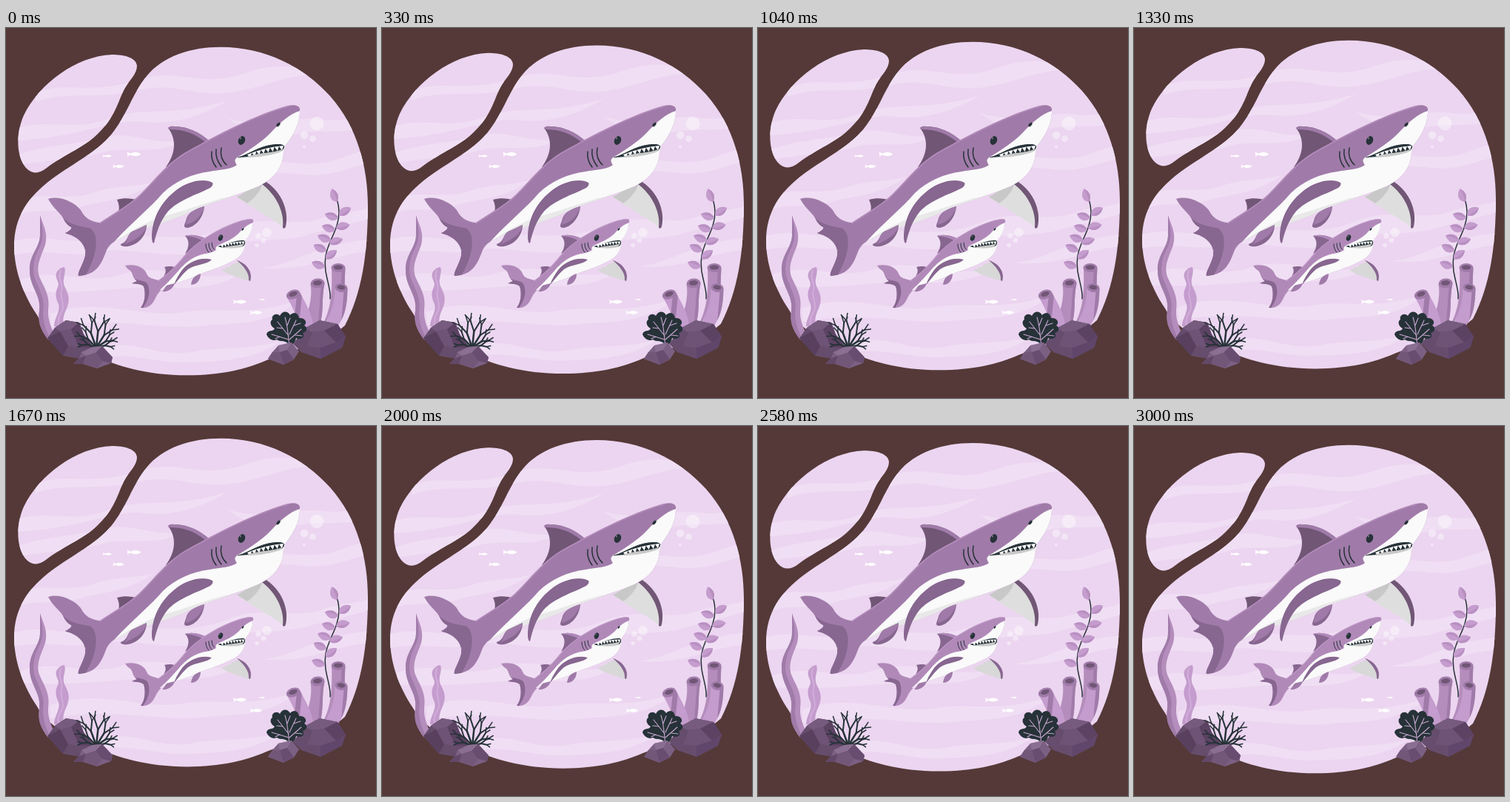
These frames come from a looping animation (500x500 px, 3040 ms). An HTML page with a canvas:

```html
<!DOCTYPE html>
<html lang="en">
<head>
<meta charset="utf-8">
<title>Two sharks</title>
<style>
html, body { margin: 0; width: 100%; height: 100%; overflow: hidden; background: #543938; }
canvas { display: block; width: 500px; height: 500px; }
</style>
</head>
<body>
<canvas id="stage"></canvas>
<script>
const LOOP = 3040, FPS = 24, RISE = 10;
const INK = '#263238', BODY = '#a07ba9', DEEP = '#715676', MID = '#876690', PALE = '#b48dbc', PINK = '#c49ccd';
const canvas = document.getElementById('stage');
const dpr = window.devicePixelRatio || 1;
canvas.width = canvas.height = 500 * dpr;
const ctx = canvas.getContext('2d');

let pen = ctx;
function fill(d, color) {
  pen.fillStyle = color;
  pen.fill(new Path2D(d));
}
function line(d, color, width) {
  pen.strokeStyle = color;
  pen.lineWidth = width;
  pen.lineCap = pen.lineJoin = 'round';
  pen.stroke(new Path2D(d));
}
function oval(x, y, rx, ry, color, turn = 0) {
  pen.fillStyle = color;
  pen.beginPath();
  pen.ellipse(x, y, rx, ry, turn, 0, Math.PI * 2);
  pen.fill();
}
function clipped(d, draw) {
  pen.save();
  pen.clip(new Path2D(d));
  draw();
  pen.restore();
}

// Water, the only part that moves
const POOL = 'M290 25.7C350 25.7 402 52 438 92C476 135 489 190 489 240C489 305 481 358 458 402C432 426 390 434 352 449C325 461 290 469.3 245 469.3C190 469.3 150 457 118 442C85 428 56 414 42 388C20 355 11 322 11 295C11 255 30 228 62 204C92 182 128 165 146 139C166 112 169 92 190 65C212 38 250 25.7 290 25.7Z';
const DROP = 'M177 51C176 40 160 36 143 36C95 38 45 75 24 118C12 145 15 175 27 189C35 198 45 197 55 189C80 170 108 160 125 142C150 118 152 95 162 79C168 69 177 62 177 51Z';
const WATER = new Path2D(POOL + DROP);
const BANDS = [
  'M40 88C80 70 110 92 180 70C230 52 260 82 320 62C360 48 390 48 420 64C380 62 350 80 310 86C260 96 230 72 180 84C120 98 80 84 40 100Z',
  'M10 137C60 120 90 142 140 122C190 105 220 122 300 98C260 122 220 132 180 126C140 124 100 148 10 152Z',
  'M15 172C60 156 85 160 130 148C170 138 200 160 240 152C200 174 165 158 130 168C90 180 60 176 15 186Z',
  'M300 122C350 138 390 118 430 124C460 128 480 118 495 112L495 130C460 146 430 136 400 142C360 148 330 146 300 122Z',
  'M310 184C370 174 400 190 440 180C460 174 480 164 495 166L495 182C460 188 440 202 400 198C370 194 340 198 310 184Z',
  'M10 236C50 218 80 236 120 222C150 212 170 216 200 208C160 236 130 232 100 242C60 254 40 240 10 256Z',
  'M5 290C50 274 80 296 130 284C180 272 240 296 300 270C350 250 390 272 430 256C460 246 480 250 495 240L495 256C460 268 430 272 400 282C350 290 310 284 280 300C220 316 170 294 130 302C90 312 50 296 5 308Z',
  'M20 340C70 322 110 350 160 332C210 316 260 348 320 330C280 358 230 350 190 350C140 352 100 360 20 356Z',
  'M345 324C390 322 410 294 490 286L490 302C440 306 410 330 345 324Z',
  'M60 386C130 362 180 394 240 384C290 376 330 392 400 366C350 404 310 398 270 402C210 410 150 388 60 404Z',
  'M120 434C170 416 200 446 250 438C290 430 320 436 370 424C330 452 280 450 240 452C200 452 170 438 120 446Z'
];
function water(dy) {
  ctx.save();
  ctx.translate(0, dy);
  ctx.clip(WATER);
  ctx.fillStyle = '#ecd5f0';
  ctx.fillRect(0, 0, 500, 500);
  BANDS.forEach(b => fill(b, '#f0dff4'));
  ctx.restore();
}

function teeth(x0, y0, x1, y1, bend, n, size) {
  pen.fillStyle = '#fff';
  pen.beginPath();
  const at = u => [x0 + (x1 - x0) * u, y0 + (y1 - y0) * u + bend * 4 * u * (1 - u)];
  for (let i = 0; i < n; i++) {
    const a = at(i / n), b = at((i + .5) / n), c = at((i + 1) / n);
    pen.moveTo(a[0], a[1]);
    pen.lineTo(b[0] + 1, b[1] + size);
    pen.lineTo(c[0], c[1]);
  }
  pen.fill();
}

function bigShark() {
  // far fins
  fill('M312 228C325 222 338 211 347 206C365 214 378 238 379 253C379 262 379 268 376 271C366 260 337 247 312 228Z', '#dedede');
  fill('M312 228C325 222 338 211 347 206C346 219 337 229 326 237Z', '#c8c8c8');
  fill('M340 207Q347 203 353 209C372 222 383 247 378 268Q377 272 374 270C377 247 363 221 340 207Z', DEEP);
  fill('M216 188C228 172 232 152 219 135Q222 132 227 133C247 133 262 142 274 152L264 168Z', DEEP);
  fill('M219 135Q222 132 227 133C247 133 262 142 274 152L269 154C254 142 240 137 222 137Z', BODY);
  fill('M148 258C154 248 154 240 150 232C160 229 170 230 179 233L166 250Z', DEEP);
  // body
  const body = 'M57 231C72 226 92 235 101 246C106 256 114 262 127 263C146 250 160 243 178 228C200 208 216 182 248 165C282 146 340 116 381 105C390 103 396 105 397 109C398 122 393 140 378 158L375 169C374 188 363 203 343 213C318 225 280 234 252 247C218 263 184 271 162 281C147 287 141 291 136 300C130 316 124 334 98 335C96 331 104 320 107 308C109 296 101 287 94 283C88 279 84 279 80 277C85 275 90 271 88 269C80 265 79 259 76 255C71 248 62 241 57 231Z';
  fill(body, BODY);
  clipped(body, () => {
    fill('M397 112C382 117 372 127 362 137C350 151 333 162 314 174Q306 178 312 185C305 191 290 191 275 194C250 197 228 208 212 223C196 242 170 263 147 288L190 300L330 240L390 190L405 112Z', '#fafafa');
    fill('M146 289C170 273 190 262 215 254C245 246 275 234 300 228L300 240L170 290Z', '#e9e9e9');
    fill('M76 255C84 265 98 268 112 270C126 275 126 305 105 338L96 335L108 300L75 275Z', MID);
    line('M127 263C146 250 160 243 178 228C200 208 216 182 248 165C282 146 340 116 381 105', PALE, 3);
  });
  // near fins
  fill('M279 209C270 203 250 206 236 215C211 231 197 256 197 283Q197 290 200 291C204 274 208 262 218 249C232 233 256 226 276 216Q281 212 279 209Z', MID);
  fill('M190 266C190 281 178 293 165 295C159 296 154 294 155 292C167 288 162 278 173 274Z', MID);
  fill('M190 266C188 279 176 286 159 293C167 287 162 278 173 274Z', BODY);
  fill('M268 241C267 256 256 269 245 270C239 270 241 266 243 261C245 250 252 246 268 241Z', MID);
  fill('M268 241C265 254 255 263 243 266C245 250 252 246 268 241Z', BODY);
  // face
  fill('M314 175C328 171 342 160 360 158Q374 156 376 160C376 165 372 167 366 168C350 172 334 174 314 175Z', INK);
  teeth(326, 171, 375, 159, -2, 8, 6);
  fill('M322 175C344 167 361 170 375 163L370 168C350 174 337 175 322 175Z', '#c9c9c9');
  line('M314 175C328 171 342 160 360 158Q374 156 376 160', INK, 1);
  oval(318.5, 152, 4.4, 6.2, INK, .45);
  oval(317, 149, 1, 1.3, '#6b7378', .4);
  oval(368, 130.5, 1.8, 3.4, INK, .7);
  line('M278 167C277 175 280 183 284 188M284 164C283 172 286 181 291 187M291 162C289 171 292 180 298 185', INK, 1.5);
}

function smallShark() {
  const skin = '#b189b9';
  fill('M291 327C300 324 307 318 316 315C325 320 331 331 331 340Q331 343 328 342C318 338 302 335 291 327Z', '#d8d8d8');
  fill('M312 314C326 318 334 331 330 342L328 341C329 331 322 323 312 314Z', MID);
  fill('M242 305C248 295 248 287 242 281C253 278 262 281 271 285L261 295Z', MID);
  fill('M242 281C253 278 262 281 271 285L266 288C259 283 250 282 242 281Z', skin);
  fill('M211 339C216 332 217 327 214 323Q222 321 228 323L222 333Z', MID);
  const body = 'M161 321C174 318 187 323 190 332C192 338 199 339 206 341C219 332 229 322 239 310C250 296 270 281 293 270C308 263 322 258 331 258Q335 258 334 263C333 273 329 281 323 288L323 295C320 308 311 313 300 318C286 325 269 329 257 335C242 342 225 345 214 351C207 355 204 361 201 367C197 375 191 379 182 378C188 371 189 358 186 349C181 345 174 346 170 345L177 342C170 337 172 332 168 328Q163 325 161 321Z';
  fill(body, skin);
  clipped(body, () => {
    fill('M334 263C327 265 320 271 314 278C305 286 297 289 286 294Q282 297 284 300C278 305 268 304 259 308C248 312 240 320 234 327C226 336 220 343 208 354L232 355L300 325L330 305L340 264Z', '#fafafa');
    fill('M170 338C180 342 191 341 192 348C196 360 191 370 184 380L180 378L186 352L168 346Z', MID);
    line('M206 341C219 332 229 322 239 310C250 296 270 281 293 270C308 263 322 258 331 258', '#c19bc9', 2);
  });
  fill('M278 313C263 309 247 316 238 327Q230 338 227 347C233 341 237 334 246 326C256 319 272 320 278 313Z', MID);
  fill('M228 345C226 352 219 357 211 356C216 352 214 348 220 347Z', BODY);
  fill('M263 332C263 341 257 347 250 347C251 340 253 335 263 332Z', BODY);
  fill('M286 295C297 293 304 288 318 287Q323 286 323 290C323 295 319 296 314 296C303 297 294 298 286 295Z', INK);
  teeth(290, 293.5, 322, 288.5, -1.3, 8, 4);
  fill('M292 297C304 293 313 295 322 291L319 296C309 298 303 298 292 297Z', '#c9c9c9');
  oval(290, 283.5, 3, 4.3, INK, .35);
  oval(289.2, 281.5, .8, 1, '#6b7378');
  oval(320, 272, 1, 2, INK, .7);
  line('M270 292Q270 299 274 303M274 291Q274 298 278 302M278 290Q278 296 281 299', INK, 1);
}

function fish(x, y, s) {
  pen.save();
  pen.translate(x, y);
  pen.scale(s, s * .85);
  fill('M10 0C6 -4 -1 -4 -5 -1L-10 -4L-9 0L-10 4L-5 1C-1 4 6 4 10 0Z', '#fff');
  pen.restore();
}
function bubble(x, y, r) {
  oval(x, y, r, r, 'rgba(255,255,255,.4)');
}

function twig(x, y, angle, size, forks) {
  const x2 = x + Math.cos(angle) * size, y2 = y + Math.sin(angle) * size;
  line(`M${x} ${y}L${x2} ${y2}`, INK, 1.5 + forks * .5);
  if (!forks) return;
  twig(x2, y2, angle - .42, size * .7, forks - 1);
  twig(x2, y2, angle + .45, size * .66, forks - 1);
}

function leftReef() {
  fill('M46 253C51 268 57 278 53 293C48 308 40 320 45 336C51 350 60 361 57 381C56 396 63 409 70 424L56 420C46 406 43 397 45 382C48 361 32 350 32 328C31 306 47 296 46 278Z', PALE);
  fill('M46 253C50 273 51 284 46 295C37 311 36 325 38 335C42 350 54 363 50 385C50 400 56 412 61 424L56 420C46 406 43 397 45 382C48 361 32 350 32 328C31 306 47 296 46 278Z', BODY);
  fill('M79 323C82 332 75 339 79 349C83 357 88 365 82 379C77 390 76 395 79 405L65 403C65 392 74 383 71 373C67 365 66 358 70 350C74 343 64 338 69 329Q74 323 79 323Z', PINK);
  line('M74 328C69 338 78 346 75 355C72 366 80 372 76 382C70 392 70 396 71 402', '#d1add9', 2);
  fill('M66 405L81 395L99 398L105 414L119 432L100 447L77 443L56 419Z', '#664d6d');
  fill('M66 405L81 395L99 398L88 407L73 410Z', '#765b7e');
  fill('M88 407L99 398L105 414L119 432L99 432Z', '#5c4263');
  fill('M73 410L88 407L99 432L84 430Z', '#6e5376');
  fill('M56 419L73 410L84 430L77 443Z', '#59405f');
  // branching coral
  [[-160, 12], [-134, 16], [-110, 21], [-84, 22], [-58, 20], [-34, 15], [-14, 12]]
    .forEach(([deg, size]) => twig(122, 432, deg * Math.PI / 180, size, 2));
  fill('M102 438L117 431L130 430L144 445L142 453L123 460L104 454L91 454L99 446Z', '#7b6083');
  fill('M102 438L117 431L130 430L121 439L108 443Z', '#8b6f92');
  fill('M121 439L130 430L144 445L142 453L130 450Z', '#694d71');
  fill('M108 443L121 439L130 450L123 460L104 454Z', '#735779');
  fill('M91 454L99 446L108 443L104 454Z', '#634969');
}

function leaf(x, y, angle) {
  pen.save();
  pen.translate(x, y);
  pen.rotate(angle * Math.PI / 180);
  fill('M0 0C4 -8 12 -8 19 -1C13 6 5 6 0 0Z', PINK);
  fill('M0 0C5 1 13 1 19 -1C13 6 5 6 0 0Z', '#b98fc2');
  pen.restore();
}
function tube(x, y, rx, ry, turn, d, color) {
  fill(d, color);
  clipped(d, () => line(`M${x + rx - 1} ${y}L${x + rx - 6} 410`, BODY, 7));
  oval(x, y, rx, ry, BODY, turn);
  oval(x, y - .5, rx * .64, ry * .52, '#715676', turn);
}

function rightReef() {
  line('M438 366C440 350 428 332 432 308C435 288 450 272 450 249C450 237 446 228 443 222', INK, 1.5);
  [[447, 235, -108], [450, 253, -30], [449, 257, -160], [446, 270, -10], [445, 273, -160],
   [437, 291, -15], [439, 287, -158], [432, 312, -35], [433, 301, -154], [431, 323, -158]]
    .forEach(l => leaf(...l));
  tube(449, 324, 9.5, 6, 0, 'M440 325C441 354 440 380 427 402L449 402C459 376 457 345 458.5 325Z', PALE);
  tube(421, 345, 9.5, 6.5, -.1, 'M411.5 346C415 370 406 384 404 402L424 402C430 382 426 366 430.5 345Z', PALE);
  tube(388, 360, 9.5, 6, -.35, 'M379 363C388 378 393 390 398 406L416 406C414 385 403 369 397 357Z', PINK);
  tube(453, 351, 8.5, 6, .15, 'M444.5 351C444 376 438 386 430 402L449 402C460 386 461 370 461.5 352Z', PINK);
  fill('M403 406L424 395L448 400L459 417L454 432L425 447L399 438L388 427Z', '#664d6d');
  fill('M403 406L424 395L448 400L430 409L414 411Z', '#765b7e');
  fill('M430 409L448 400L459 417L446 425Z', '#5c4263');
  fill('M414 411L430 409L446 425L425 432L407 430Z', '#6e5376');
  fill('M446 425L459 417L454 432L425 447L425 432Z', '#60466a');
  // fan coral
  fill('M381 426C374 421 372 425 366 421C360 424 354 419 352 414C354 407 361 411 363 406C357 403 356 396 360 394C358 388 366 384 370 389C374 382 380 382 384 388C390 382 395 386 396 392C404 391 408 398 403 402C409 405 406 411 401 412C405 418 398 422 392 419C391 425 388 426 386 430Z', INK);
  line('M383 430C381 416 381 403 377 391M382 416L367 397M382 421L359 414M383 414L392 395M383 421L399 407M374 406L366 405M389 402L398 399M370 417L364 420M391 415L400 416M380 402L384 392', '#c7a6ce', 1.1);
  fill('M368 429L386 425L396 437L389 448L375 455L354 447L360 438Z', '#7b6083');
  fill('M368 429L386 425L380 435L370 438Z', '#8b6f92');
  fill('M370 438L380 435L389 448L375 455Z', '#694d71');
  fill('M354 447L360 438L370 438L375 455Z', '#735779');
}

// The still scene is painted once
const still = document.createElement('canvas');
still.width = still.height = canvas.width;
pen = still.getContext('2d');
pen.scale(dpr, dpr);
[[137, 173, .6], [173, 170.5, .95], [152, 187, .75], [316, 370, .9], [338, 384.5, .8], [346, 367, .4]].forEach(f => fish(...f));
[[420, 129, 9.3], [403, 145, 5.3], [414.5, 149.5, 4.3], [403, 160.5, 2], [352.5, 276.5, 6.2], [341, 281, 3.8], [348, 287, 3.5], [339, 293.5, 2.8]].forEach(b => bubble(...b));
bigShark();
smallShark();
leftReef();
rightReef();
pen = ctx;

const start = performance.now();
function frame(now) {
  const t = Math.max(0, now - start) % LOOP;
  const u = Math.floor((t + 5) * FPS / 1000) / FPS / 3;
  const lift = RISE * (1 - Math.abs(1 - 2 * Math.min(u, 1)));
  ctx.setTransform(dpr, 0, 0, dpr, 0, 0);
  ctx.fillStyle = '#543938';
  ctx.fillRect(0, 0, 500, 500);
  water(-lift);
  ctx.drawImage(still, 0, 0, 500, 500);
  requestAnimationFrame(frame);
}
frame(start);
</script>
</body>
</html>
```
